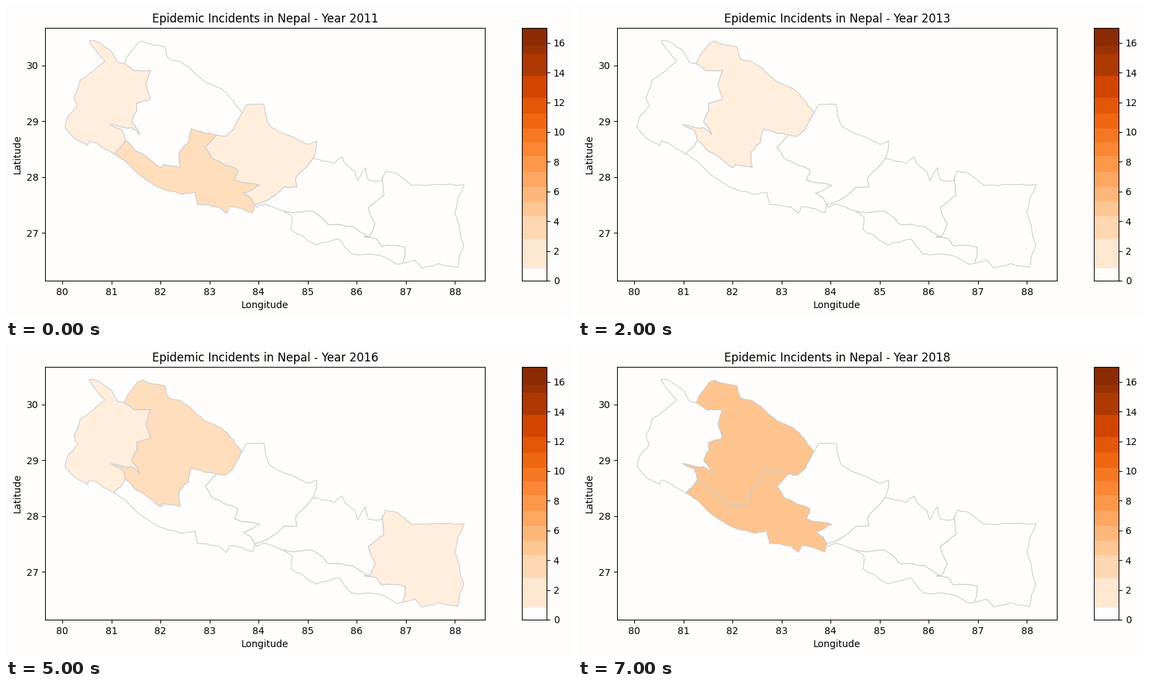
These frames come from a looping animation (825 by 454 pixels, 8 s). A matplotlib script:

```python
import numpy as np
import matplotlib.pyplot as plt
from matplotlib.animation import FuncAnimation
from matplotlib.patches import Polygon

W, H, DPI = 825, 454, 100
LEFT, RIGHT, TOP, BOTTOM = 57, 698, 32, 401
PAPER = "#fefdfc"
PX_LON, PX_LAT = 71.55, 81.35
MAX_COUNT = 17
ORANGES = plt.get_cmap("Oranges")

# Pixel rows between the colour steps of the bar, from zero up.
BAR_ROWS = [BOTTOM, 383, 340, 307, 286, 264, 242, 219, 199, 179, 157, 134,
            102, 70, 58, TOP]

rng = np.random.default_rng(7)


def lonlat(points):
    x, y = np.asarray(points, float).T
    return np.column_stack([80 + (x - 82) / PX_LON, 30 - (y - 87) / PX_LAT])


def border(*points, levels=3, wiggle=0.07):
    """Rugged line through the points, by seeded midpoint displacement."""
    p = np.array(points, float)
    for _ in range(levels):
        step = np.diff(p, axis=0)
        normal = np.column_stack([-step[:, 1], step[:, 0]])
        shift = rng.uniform(-wiggle, wiggle, (len(step), 1))
        middle = p[:-1] + step / 2 + normal * shift
        p = np.insert(p, range(1, len(p)), middle, axis=0)
    return p


def join(*borders):
    return lonlat(np.concatenate(borders))


# Places where borders meet.
NW, WMID, SW = (172, 84), (174, 196), (157, 216)
MID, NMID, NC = (307, 188), (344, 156), (448, 222)
SC, TERAI, NE = (362, 290), (404, 299), (549, 250)
EMID, SE = (529, 337), (579, 375)

far_west = border(
    SW, (122, 197), (119, 204), (104, 196), (86, 178), (91, 160), (104, 145),
    (99, 133), (108, 108), (126, 96), (144, 80), (121, 51), (128, 50),
    (155, 68), (162, 82), NW)
west_line = border(
    NW, (188, 95), (211, 94), (204, 116), (210, 136), (190, 142), (191, 153),
    (183, 169), (195, 188), (184, 178), (170, 177), (152, 173), (169, 181),
    WMID)
west_foot = border(WMID, SW)
north_west = border(
    NW, (181, 68), (190, 56), (199, 51), (232, 60), (237, 77), (253, 81),
    (277, 100), (292, 112), (314, 121), (328, 135), NMID)
upper_line = border(NMID, (332, 179), (320, 190), MID)
mid_line = border(
    MID, (270, 179), (266, 199), (252, 214), (254, 235), (230, 231),
    (226, 236), (206, 221), WMID)
inner_line = border(
    MID, (290, 206), (301, 223), (338, 239), (333, 254), (370, 262),
    (346, 273), (358, 281), SC)
south_west = border(
    SW, (172, 225), (188, 241), (216, 261), (257, 275), (276, 272),
    (279, 290), (311, 294), (321, 303), (326, 293), (360, 302), SC)
north_mid = border(
    NMID, (351, 144), (376, 144), (385, 176), (440, 202), (453, 197), NC)
center_line = border(
    NC, (436, 237), (422, 251), (424, 264), (405, 264), (380, 284), SC)
north_east = border(
    NC, (478, 230), (490, 220), (494, 230), (509, 242), (513, 255),
    (524, 236), (528, 254), (548, 255), NE)
east_line = border(NE, (551, 276), (528, 294), (538, 318), EMID)
plain_line = border(EMID, (506, 322), (468, 318), (448, 300), TERAI)
center_foot = border(SC, (365, 294), (378, 289), TERAI)
south_plain = border(
    TERAI, (417, 308), (415, 326), (452, 349), (485, 340), (503, 362),
    (538, 363), (570, 377), SE)
plain_end = border(SE, (582, 352), (548, 351), (540, 340), (522, 337), EMID)
far_east = border(
    NE, (553, 241), (565, 243), (592, 262), (648, 260), (668, 261),
    (654, 303), (667, 350), (658, 382), (630, 376), (606, 383), (596, 371),
    SE)

SHAPES = {
    "east": join(far_east, plain_end, east_line[::-1]),
    "plain": join(south_plain, plain_end, plain_line),
    "center": join(north_east, east_line, plain_line, center_foot[::-1],
                   center_line[::-1]),
    "upper": join(north_mid, center_line, inner_line[::-1], upper_line[::-1]),
    "lower": join(south_west, inner_line[::-1], mid_line, west_foot),
    "north": join(north_west, upper_line, mid_line, west_line[::-1]),
    "west": join(far_west, west_line, west_foot),
}

# Incidents per region; regions left out have none.
COUNTS = {
    2011: dict(west=1, upper=1, lower=3),
    2012: dict(west=17, north=1, upper=1, center=1, lower=7),
    2013: dict(north=1),
    2014: dict(east=1),
    2015: dict(north=3),
    2016: dict(west=1, north=3, east=1),
    2017: dict(north=8, center=1, plain=1, east=1),
    2018: dict(north=5, lower=5),
}
YEARS = list(COUNTS)


def shade(count):
    return ORANGES(count / MAX_COUNT) if count >= 0.8 else PAPER


def pixel_axes(left, right):
    return fig.add_axes([left / W, 1 - BOTTOM / H,
                         (right - left) / W, (BOTTOM - TOP) / H],
                        facecolor=PAPER)


fig = plt.figure(figsize=(W / DPI, H / DPI), dpi=DPI, facecolor=PAPER)

ax = pixel_axes(LEFT, RIGHT)
(x0, y0), (x1, y1) = lonlat([(LEFT, BOTTOM), (RIGHT, TOP)])
ax.set(xlim=(x0, x1), ylim=(y0, y1), xticks=range(80, 89),
       yticks=range(27, 31), xlabel="Longitude", ylabel="Latitude")
title = ax.set_title("")

regions = {
    name: ax.add_patch(Polygon(shape, facecolor=PAPER, edgecolor="0.8",
                               linewidth=0.8, joinstyle="round"))
    for name, shape in SHAPES.items()
}

bar = pixel_axes(752, 788)
levels = (BOTTOM - np.array(BAR_ROWS)) * MAX_COUNT / (BOTTOM - TOP)
for low, high in zip(levels[:-1], levels[1:]):
    bar.axhspan(low, high, facecolor=shade((low + high) / 2), linewidth=0)
bar.set(xlim=(0, 1), ylim=(0, MAX_COUNT), xticks=[], yticks=range(0, 17, 2))
bar.yaxis.tick_right()


def draw(i):
    year = YEARS[i]
    title.set_text(f"Epidemic Incidents in Nepal - Year {year}")
    for name, patch in regions.items():
        patch.set_facecolor(shade(COUNTS[year].get(name, 0)))
    return [title, *regions.values()]


anim = FuncAnimation(fig, draw, frames=len(YEARS), interval=1000, repeat=True)
plt.show()
```
